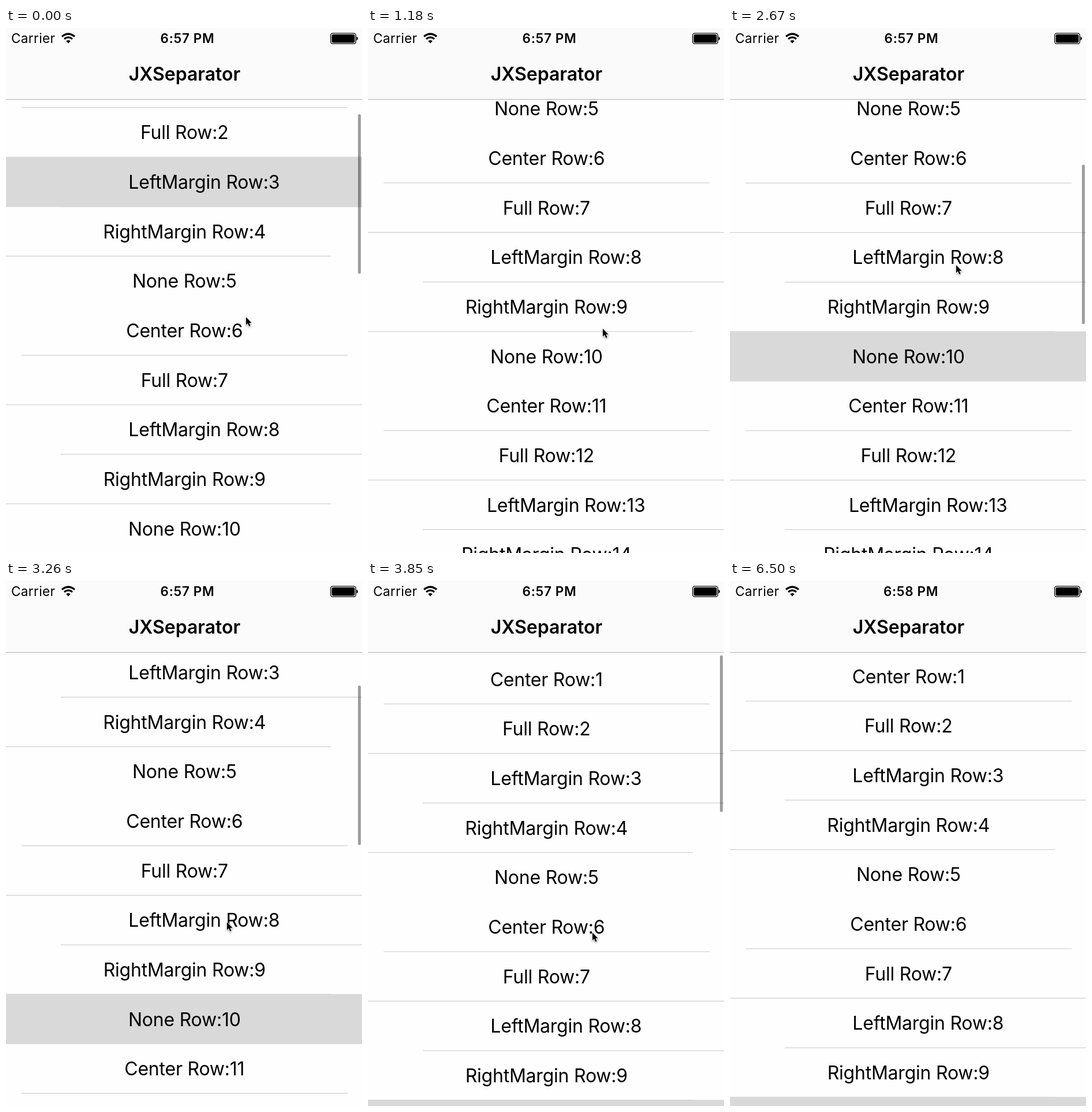
An HTML page for the animation above (6770 ms loop, 617 by 908 pixels).

```html
<!DOCTYPE html>
<html lang="en">
<head>
<meta charset="utf-8">
<title>JXSeparator</title>
<style>
  html, body { margin: 0; width: 100%; height: 100%; overflow: hidden; background: #fefefe; }
  svg { display: block; width: 617px; height: 908px; }
  text { font: 32px Inter, "Liberation Sans", sans-serif; letter-spacing: -.23px; text-anchor: middle; }
  .title { font-weight: 600; letter-spacing: 0; }
  .status { font-size: 22.5px; letter-spacing: .4px; }
  .time { font-weight: 600; letter-spacing: .65px; }
  .line { fill: #c6c6c8; }
</style>
</head>
<body>
<svg viewBox="0 0 617 908">
  <rect width="617" height="908" fill="#fefefe"/>
  <g id="rows"></g>
  <rect id="bar" x="610" width="5" rx="2.5"/>

  <rect id="header" width="617" height="123"/>
  <rect y="123" width="617" height="1" opacity=".3"/>
  <text class="title" x="309.5" y="91">JXSeparator</text>

  <text class="status" x="9" y="26" style="text-anchor:start">Carrier</text>
  <g fill="none" stroke="#000" stroke-width="3.2">
    <path d="M97 14.7Q108 5.8 119 14.7M101 19Q108 13.4 115 19"/>
    <path d="M108 26.5L104.2 22.6Q108 19.6 111.8 22.6Z" fill="#000" stroke="none"/>
  </g>
  <text class="status time" id="clock" y="26"></text>
  <rect x="562.7" y="9.2" width="43.6" height="18" rx="3.5" fill="none" stroke="#000" stroke-width="1.3"/>
  <rect x="564.6" y="11" width="39.8" height="14.4" rx="2"/>
  <path d="M607.5 15Q610 15.5 610 18.2T607.5 21.4Z"/>

  <g id="cursor">
    <path d="M0 0V13.5L3 10.8 5.3 16 7.7 15 5.4 10H9.7Z" stroke="#fff" stroke-width="1.6"
          paint-order="stroke" style="filter:drop-shadow(0 1px 1.5px rgba(0,0,0,.4))"/>
  </g>
</svg>
<script>
const LOOP = 6770, STEP = 147.5;
const WIDTH = 617, CENTER = 309.3;
const ROW_HEIGHT = 85.65, FIRST_BOTTOM = 207.2;
const $ = id => document.getElementById(id);

// Separator insets; rows cycle through these kinds
const KINDS = [
  { name: 'None' },
  { name: 'Center', left: 27, right: 25 },
  { name: 'Full', left: 0, right: 0 },
  { name: 'LeftMargin', left: 95, right: 0, shift: 34 },
  { name: 'RightMargin', left: 0, right: 54 },
];

// Pointer waypoints: step, x, y
const POINTER = [
  [0, 416, 500], [2, 455, 660], [5, 455, 538], [8, 407, 520], [10, 406, 582], [13, 406, 582],
  [18, 392, 410], [22, 383, 590], [26, 389, 608], [31, 364, 660], [38, 480, 732], [41, 152, 85],
];

const ramp = (step, from, to) => Math.min(1, Math.max(0, (step - from) / (to - from)));
const ease = (step, from, to) => {
  const k = ramp(step, from, to);
  return k * k * (3 - 2 * k);
};
const bottomOf = n => FIRST_BOTTOM + (n - 1) * ROW_HEIGHT;

// A flick down the list, a drag back to the top, and the rebound
const scrollAt = step =>
  70 + 298 * ease(step, 1.45, 8) - 373 * ease(step, 17.9, 26) + 5 * ramp(step, 26, 28);

// The indicator shows while scrolling and fades after each move
const indicatorAt = step => 1 - ramp(step, 6, 8) + ramp(step, 16, 18) - ramp(step, 27, 30);

function pointerAt(step) {
  const i = POINTER.findIndex(point => point[0] > step);
  const [from, x0, y0] = POINTER[i - 1], [to, x1, y1] = POINTER[i];
  const k = ramp(step, from, to);
  return [x0 + (x1 - x0) * k, y0 + (y1 - y0) * k];
}

function set(id, attributes) {
  for (const name in attributes) $(id).setAttribute(name, attributes[name]);
}

let markup = '';
for (let n = 0; n < 18; n++) {
  const { name, left, right, shift = 0 } = KINDS[n % KINDS.length];
  const bottom = bottomOf(n);
  if (left !== undefined) {
    markup += `<rect class="line" x="${left}" y="${bottom}" width="${WIDTH - left - right}" height="1"/>`;
  }
  markup += `<text x="${CENTER + shift}" y="${bottom - 30.5}">${name} Row:${n}</text>`;
}
$('rows').innerHTML = markup;

// The highlight covers the separators on both its edges, but stays below the labels
const highlight = document.createElementNS('http://www.w3.org/2000/svg', 'rect');
highlight.id = 'highlight';
$('rows').insertBefore(highlight, $('rows').querySelector('text'));
document.querySelectorAll('.line').forEach(line => $('rows').insertBefore(line, highlight));
set('highlight', { width: WIDTH, height: ROW_HEIGHT + 1, fill: '#d9d9d9' });

function draw(time) {
  const step = Math.floor((time + 1) / STEP);
  const scroll = scrollAt(step);
  const selectedTop = bottomOf(step < 12 ? 2 : 9);

  set('rows', { transform: `translate(0 ${-scroll})` });
  set('highlight', { y: selectedTop });

  // The header takes on some grey from a highlighted row beneath it
  const top = selectedTop - scroll;
  const covered = Math.max(0, Math.min(123, top + ROW_HEIGHT) - Math.max(0, top)) / ROW_HEIGHT;
  const grey = Math.round(251 - 10 * covered);
  set('header', { fill: `rgb(${grey},${grey},${grey})` });

  set('bar', {
    y: 128.5 + Math.max(0, scroll) * .293,
    height: 276 + Math.min(0, scroll),
    opacity: .38 * indicatorAt(step),
  });

  const pointing = step < 41;
  set('cursor', { visibility: pointing ? 'visible' : 'hidden' });
  if (pointing) set('cursor', { transform: `translate(${pointerAt(step)})` });

  const late = time >= 6499;
  set('clock', { x: late ? 313.5 : 314.5 });
  $('clock').textContent = late ? '6:58 PM' : '6:57 PM';
}

const start = performance.now();
function tick() {
  draw((performance.now() - start) % LOOP);
  requestAnimationFrame(tick);
}
tick();
</script>
</body>
</html>
```
